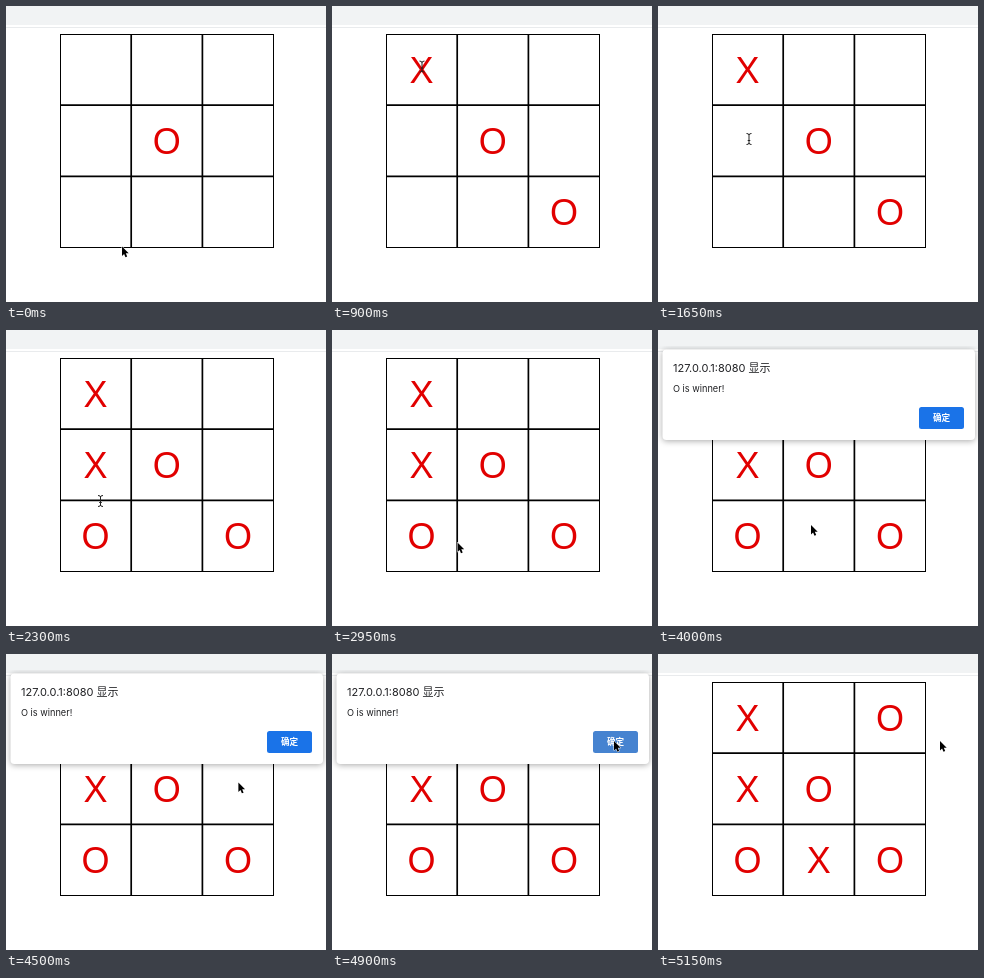
Animation, 320 px wide and 296 px high, one loop 5.29 s. Source, as an HTML page:

```html
<!DOCTYPE html>
<html lang="en">
<head>
<meta charset="utf-8">
<style>
  html, body { margin: 0; width: 100%; height: 100%; overflow: hidden; background: #fff; }
  #stage { position: relative; width: 320px; height: 296px; overflow: hidden; contain: strict; }
  #clip { position: absolute; inset: 16px 0 0; overflow: hidden; }
  svg { position: absolute; left: 0; top: 0; display: block; overflow: hidden; }
  #dialog { top: -16px; transform-origin: 160px 110px; font-family: Inter, "Noto Sans CJK SC", "Noto Sans CJK", sans-serif; }
  #panel { filter: drop-shadow(0 1px 3px rgba(0, 0, 0, .34)); }
  #marks { font: 36px "Liberation Sans", Arial, sans-serif; fill: #e10000; text-anchor: middle; }
</style>
</head>
<body>
<div id="stage">
  <svg width="320" height="296">
    <rect width="320" height="19" fill="#f1f3f4"/>
    <rect y="21" width="320" height="1" fill="#e9ebed"/>
    <g stroke="#000" fill="none">
      <rect x="54.5" y="28.5" width="213" height="213"/>
      <path stroke-width="1.7" d="M125.2 28V241M196.4 28V241M54 99.2H267M54 170.3H267"/>
    </g>
    <g id="marks"></g>
  </svg>

  <div id="clip">
    <svg id="dialog" width="320" height="120">
      <rect id="panel" x="4.5" y="19.5" width="312.5" height="90.5" rx="4" fill="#fff"/>
      <text x="15" y="42" font-size="11" fill="#202124">127.0.0.1:8080 显示</text>
      <text x="15" y="62" font-size="9.2" fill="#202124">O is winner!</text>
      <rect id="button" x="261" y="77" width="45" height="22" rx="2.5"/>
      <text x="283.5" y="91.2" font-size="8.6" font-weight="700" fill="#fff" text-anchor="middle">确定</text>
    </svg>
  </div>

  <svg width="320" height="296">
    <g id="cursor">
      <path id="arrow" d="M0 0V9.4L2.1 7.4 3.5 10.8 5.2 10.1 3.8 6.8H6.7Z"
        stroke="#fff" paint-order="stroke" stroke-linejoin="round"/>
      <path id="beam" d="M-2.5-5.5Q0-5.5 0-4Q0-5.5 2.5-5.5M0-4.5V4.5M-2.5 5.5Q0 5.5 0 4Q0 5.5 2.5 5.5M-1.3 1.5H1.3"
        fill="none" stroke="#222"/>
    </g>
  </svg>
</div>

<script>
const LOOP = 5290, STEP = 50;
const $ = id => document.getElementById(id);
const show = (el, on) => { el.style.display = on ? "" : "none"; };

// 0 before start, 1 after start + duration, linear between
const ramp = (t, start, duration) => Math.min(1, Math.max(0, (t - start) / duration));

// Time of each turn and the symbols placed, with their cell counted from the top left
const turns = { 0: "O4", 700: "X0 O8", 2100: "X3 O6", 5050: "X7 O2" };

const marks = Object.entries(turns).flatMap(([time, placed]) =>
  placed.split(" ").map(([symbol, cell]) => {
    const el = document.createElementNS("http://www.w3.org/2000/svg", "text");
    el.textContent = symbol;
    el.setAttribute("x", 89.5 + cell % 3 * 71.2);
    el.setAttribute("y", 76.8 + Math.floor(cell / 3) * 71.2);
    $("marks").append(el);
    return { el, time: +time };
  }));

// Pointer glides: start, duration, destination
const glides = [
  [0, 50, 104, 70], [250, 300, 96, 50], [650, 100, 90, 46], [850, 250, 90, 119],
  [1250, 400, 91, 133], [2050, 500, 98, 209], [2600, 150, 105, 211],
  [2900, 50, 125.5, 212.5], [2950, 550, 160, 200], [3850, 150, 153, 195], [4100, 650, 282, 87]
];

function pointerAt(t) {
  return glides.reduce(([x, y], [start, duration, toX, toY]) => {
    const p = ramp(t, start, duration);
    return [x + (toX - x) * p, y + (toY - y) * p];
  }, [116, 240.5]);
}

// The dialog starts to appear, stalls, then opens fully; later it fades away
const dialogFade = t =>
  (.13 * ramp(t, 3450, 100) + .87 * ramp(t, 3700, 150)) * (1 - ramp(t, 4950, 200));

function draw(now) {
  const t = Math.floor(now % LOOP / STEP) * STEP;
  marks.forEach(({ el, time }) => show(el, t >= time));

  const isBeam = t >= 50 && t < 2950;
  $("cursor").setAttribute("transform", `translate(${pointerAt(t)})`);
  show($("beam"), isBeam);
  show($("arrow"), !isBeam);

  const fade = dialogFade(t), away = 1 - fade;
  show($("dialog"), fade > 0);
  $("dialog").style.opacity = fade;
  $("dialog").style.transform =
    away ? `translateY(${-16 * away}px) perspective(200px) rotateX(${8 * away}deg)` : "none";
  $("button").setAttribute("fill", t >= 4900 ? "#4683d0" : "#1a73e8");
}

function tick(now) {
  draw(now);
  requestAnimationFrame(tick);
}
draw(0);
requestAnimationFrame(tick);
</script>
</body>
</html>
```
